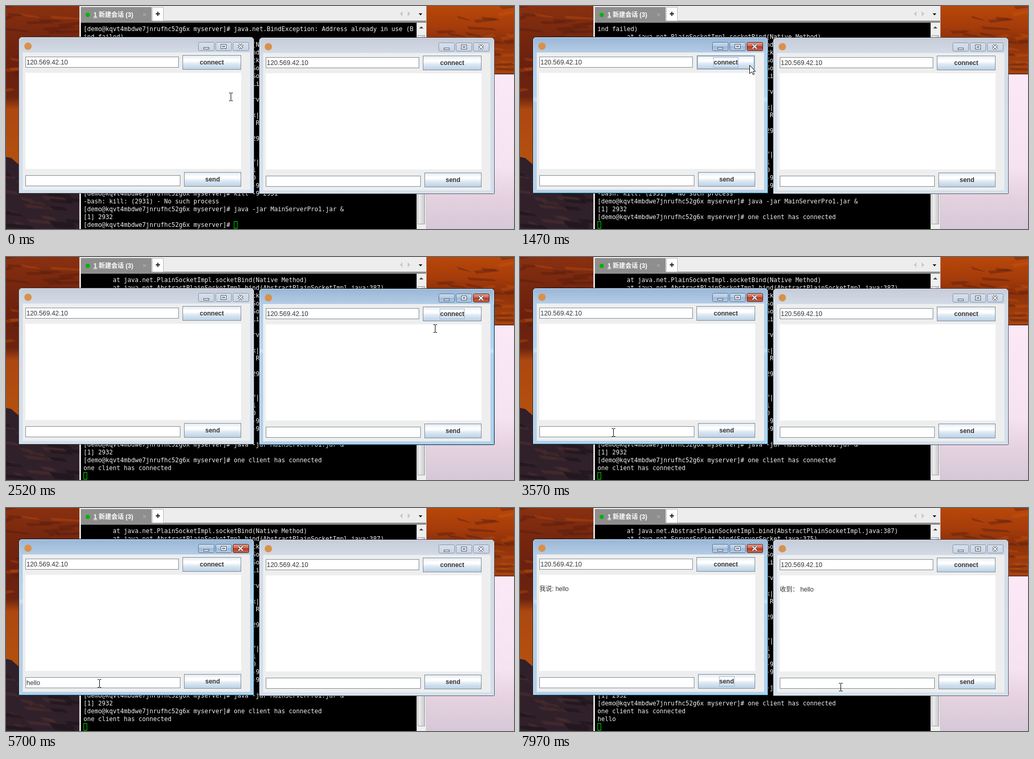
Animation, 970 px wide and 427 px high, one loop 8000 ms. Source, as an HTML page with a canvas:

```html
<!DOCTYPE html>
<html lang="en">
<head>
<meta charset="utf-8">
<title>Chat demo</title>
<style>
html, body { margin: 0; width: 100%; height: 100%; overflow: hidden; }
canvas { display: block; }
</style>
</head>
<body>
<canvas id="stage" width="970" height="427"></canvas>
<script>
const g = document.getElementById('stage').getContext('2d');
const LOOP = 8000, STEP = 150, LINE = 15;
const MONO = '11.63px "DejaVu Sans Mono", monospace';
const SANS = '"Liberation Sans", "Noto Sans CJK SC", sans-serif';

// Terminal contents; most rows show only in the gap between the two windows.
const prompt = '[demo@kqvt4mbdwe7jnrufhc52g6x myserver]# ';
const at = '        at java.net.';
const terminal = [
  prompt + 'java.net.BindException: Address already in use (B',
  'ind failed)',
  at + 'PlainSocketImpl.socketBind(Native Method)',
  at + 'AbstractPlainSocketImpl.bind(AbstractPlainSocketImpl.java:387)',
  at + 'ServerSocket.bind(ServerSocket.java:375)',
  at + 'ServerSocket.<init>(ServerSocket.java:237)',
  at + 'ServerSocket.<init>(ServerSocket.java:128)',
  ...['Li', '', 'rv', '', 'x|', ' R', '', '29', '', '', 'f|', '1 ', '0 ', '-9'].map(s => s.padStart(48)),
  prompt + 'kill -9 2931',
  '-bash: kill: (2931) - No such process',
  prompt + 'java -jar MainServerPro1.jar &',
  '[1] 2932'
];
const replies = [prompt + 'one client has connected', 'one client has connected', 'hello'];
const replyTimes = [1470, 2520, 6910];

// Mouse moves: start, number of steps, end point
const moves = [
  [120, 4, 405, 113], [1470, 6, 851, 114], [2520, 1, 819, 137],
  [2670, 6, 178, 336], [6010, 5, 419, 333], [7370, 5, 612, 343]
];

const within = (t, a, b) => t >= a && t < b;

function rect(x, y, w, h, fill) {
  g.fillStyle = fill;
  g.fillRect(x, y, w, h);
}
function frame(x, y, w, h, color) {
  g.strokeStyle = color;
  g.lineWidth = 1;
  g.strokeRect(x + .5, y + .5, w - 1, h - 1);
}
function text(s, x, y, font, color, align = 'left') {
  g.font = font;
  g.fillStyle = color;
  g.textAlign = align;
  g.fillText(s, x, y);
}
function shape(color, ...points) {
  g.fillStyle = color;
  g.beginPath();
  for (let i = 0; i < points.length; i += 2) g.lineTo(points[i], points[i + 1]);
  g.closePath();
  g.fill();
}
function dot(x, y, r, color) {
  g.fillStyle = color;
  g.beginPath();
  g.arc(x, y, r, 0, 7);
  g.fill();
}
function line(color, width, ...points) {
  g.strokeStyle = color;
  g.lineWidth = width;
  g.beginPath();
  for (let i = 0; i < points.length; i += 4) {
    g.moveTo(points[i], points[i + 1]);
    g.lineTo(points[i + 2], points[i + 3]);
  }
  g.stroke();
}
function shade(y0, y1, ...stops) {
  const fill = g.createLinearGradient(0, y0, 0, y1);
  for (let i = 0; i < stops.length; i += 2) fill.addColorStop(stops[i], stops[i + 1]);
  return fill;
}

function desktop() {
  let seed = 7;
  const random = () => (seed = seed * 16807 % 2147483647) / 2147483647;
  rect(0, 0, 141, 427, shade(0, 300, 0, '#8a3010', .2, '#75260e', .4, '#6a200e', .58, '#6c240f', .66, '#ac4810', 1, '#b4500e'));
  rect(803, 0, 167, 131, shade(0, 131, 0, '#b8480a', .3, '#a63c0a', .5, '#8c300a', 1, '#a8440e'));
  for (let i = 0; i < 70; i++) {
    const right = i % 2;
    const x = right ? 795 + random() * 160 : random() * 130 - 20, y = random() * (right ? 118 : 175);
    const w = 18 + random() * 42, tilt = random() * 14 - 7;
    shape(random() < .6 ? '#4a181058' : '#d25a1048', x, y, x + w, y + tilt, x + w + 8, y + tilt + 4, x + 5, y + 6);
  }
  shape('#30202a', 0, 289, 10, 291, 25, 304, 60, 325, 141, 345, 141, 427, 0, 427);
  for (let i = 0; i < 24; i++) {
    const x = random() * 140 - 20, y = 312 + random() * 110, w = 15 + random() * 35;
    shape(i % 2 ? '#4c2e2e90' : '#1a121890', x, y, x + w, y + 4, x + w + 8, y + 11, x + 6, y + 7);
  }
  rect(803, 130, 167, 297, shade(130, 427, 0, '#fbe9f7', .6, '#f5e3f2', .78, '#e6d2e0', 1, '#d6c8d8'));
  rect(803, 129, 167, 2, '#6c3028');
}

function terminalWindow(t) {
  rect(140, 0, 663, 427, '#ededed');
  rect(140, 0, 1, 427, '#d0d0d0');
  rect(143, 28, 659, 4, '#8e8e8e');
  rect(143, 2, 135, 28, '#8e8e8e');
  dot(156, 17, 4, '#00b400');
  text('1 新建会话 (3)', 167, 21, 'bold 12px ' + SANS, '#fff');
  rect(167, 22, 7, 1, '#fff');
  line('#c4c4c4', 1, 262, 14, 267, 19, 267, 14, 262, 19);
  rect(279, 2, 22, 26, '#fff');
  frame(279, 2, 22, 27, '#b8b8b8');
  rect(286, 14, 8, 2, '#222');
  rect(289, 11, 2, 8, '#222');
  shape('#c6c8d2', 757, 10, 752, 15, 757, 20);
  shape('#c6c8d2', 767, 10, 772, 15, 767, 20);
  shape('#111', 788, 14, 795, 14, 791.5, 18);

  rect(143, 32, 641, 395, '#000');
  rect(784, 32, 18, 395, '#efefef');
  shape('#444', 789, 43, 793, 39, 797, 43);
  const thumb = g.createLinearGradient(786, 0, 800, 0);
  thumb.addColorStop(0, '#f4f4f5');
  thumb.addColorStop(.5, '#e0e0e2');
  thumb.addColorStop(1, '#c4c4c8');
  rect(786, 56, 14, 362, thumb);
  frame(786, 56, 14, 362, '#a0a0a4');
  rect(802, 0, 1, 427, '#c4c4c4');

  const count = replyTimes.filter(x => t >= x).length;
  const rows = [...terminal, ...(count ? replies.slice(0, count) : [prompt])];
  rows.slice(count).forEach((row, i) => text(row, 148, 48 + i * LINE, MONO, '#f0f0f0'));
  frame(count ? 148 : 435, 412, 7, 14, '#00e000');
}

function button(label, x, y, w, { pressed, hover, focus }) {
  rect(x, y, w, 28, pressed ? '#b8cfe5'
    : shade(y, y + 28, 0, '#dde8f3', .3, '#fff', .4, '#fff', .6, '#dde8f3', 1, '#b8cfe5'));
  if (hover && !pressed) {
    frame(x, y, w, 28, '#b8cfe5');
    frame(x + 1, y + 1, w - 2, 26, '#7a8a99');
    frame(x + 2, y + 2, w - 4, 24, '#b8cfe5');
  } else {
    frame(x, y, w, 28, '#7a8a99');
    if (pressed) line('#7a8a99', 1, x, y + 1.5, x + w, y + 1.5);
  }
  const center = x + w / 2;
  text(label, center, y + 18, 'bold 12px ' + SANS, '#333', 'center');
  if (focus) {
    const size = Math.round(g.measureText(label).width) + 2;
    frame(Math.round(center - size / 2), y + 4, size, 20, '#a3b8cc');
  }
}

function field(s, y, w) {
  rect(37, y, w, 21, '#fff');
  frame(37, y, w, 21, '#7a8a99');
  text(s, 39, y + 15, '12.4px ' + SANS, '#333');
}

function titleButton(x, w, active, close) {
  const red = active && close;
  g.beginPath();
  g.roundRect(x + .5, 69.5, w - 1, 16, 2);
  g.fillStyle = red ? shade(69, 86, 0, '#e3a594', .45, '#cd6650', .5, '#b23a20', 1, '#cc6a4c')
    : active ? shade(69, 86, 0, '#c9dcef', .45, '#b4cce5', .5, '#9cb9d8', 1, '#b3cfe9')
    : shade(69, 86, 0, '#d8e1ec', 1, '#c7d4e4');
  g.fill();
  g.strokeStyle = red ? '#5c2018' : active ? '#5c7390' : '#8694a8';
  g.lineWidth = 1;
  g.stroke();
}

function chatWindow(dx, dy, { active, message, input, caret, connect, send }) {
  g.save();
  g.translate(dx, dy);
  g.beginPath();
  g.roundRect(24.5, 59.5, 449, 299, [6, 6, 1, 1]);
  g.fillStyle = active ? shade(60, 358, 0, '#9ab6d6', .1, '#b4cde7', .38, '#b9d3ec', .4, '#cfe2f4', .42, '#b4d0ea', 1, '#b5d0ea')
    : shade(60, 358, 0, '#c6ccd8', .1, '#d3dbe6', 1, '#d3e0ee');
  g.fill();
  g.lineWidth = 1;
  g.strokeStyle = active ? '#1c2630' : '#4c525c';
  g.stroke();
  g.beginPath();
  g.roundRect(25.5, 60.5, 447, 297, [5, 5, 0, 0]);
  g.strokeStyle = active ? '#d4ecfa' : '#e6ebf2';
  g.stroke();
  if (active) line('#62d2f2', 1, 472.5, 90, 472.5, 358, 25, 357.5, 473, 357.5);
  dot(42, 77, 7, '#d9914a');

  titleButton(367, 31, active);
  titleButton(400, 31, active);
  titleButton(433, 31, active, true);
  rect(377, 79, 11, 4, '#4a5260');
  rect(378, 80, 9, 2, '#fff');
  rect(410, 73, 11, 9, '#4a5260');
  rect(411, 74, 9, 7, '#fff');
  rect(413, 76, 5, 3, '#4a5260');
  rect(414, 77, 3, 1, '#fff');
  const cross = [444, 73.5, 452, 81.5, 452, 73.5, 444, 81.5];
  line('#4a5260', 4, ...cross);
  line('#fff', 2, ...cross);

  rect(32, 89, 434, 263, '#eee');
  field('120.569.42.10', 97, 293);
  button('connect', 337, 94, 112, connect);
  rect(37, 128, 412, 184, '#fff');
  text(message, 37, 159, '12px ' + SANS, '#333');
  field(input, 324, 296);
  if (caret) rect(39 + Math.round(g.measureText(input).width), 326, 1, 18, '#333');
  button('send', 340, 318, 109, send);
  g.restore();
}

function mouseAt(t) {
  let x = 429, y = 174;
  for (const [start, steps, endX, endY] of moves) {
    if (t < start) break;
    const p = Math.min(1, (Math.floor((t - start) / STEP) + 1) / steps);
    const eased = steps > 1 ? p * p * (3 - 2 * p) : p;
    x += (endX - x) * eased;
    y += (endY - y) * eased;
  }
  return { x: Math.round(x), y: Math.round(y) };
}

// Does the mouse lie in a box given in the coordinates of the left window?
function over({ x, y }, dx, dy, left, top, w, h) {
  return within(x - dx, left, left + w) && within(y - dy, top, top + h);
}

function pointer(m) {
  const overText = [[0, 0], [459, 1]].some(([dx, dy]) =>
    over(m, dx, dy, 37, 97, 293, 21) || over(m, dx, dy, 37, 128, 412, 184) || over(m, dx, dy, 37, 324, 296, 21));
  const { x, y } = m;
  if (overText) {
    rect(x, y - 7, 1, 14, '#000');
    for (const end of [-8, 7]) {
      rect(x - 3, y + end, 3, 1, '#000');
      rect(x + 1, y + end, 3, 1, '#000');
    }
    return;
  }
  g.save();
  g.translate(x + .5, y + .5);
  shape('#fff', 0, 0, 0, 16, 4, 12.5, 6.5, 18, 9, 17, 6.5, 11.5, 11, 11.5);
  g.strokeStyle = '#000';
  g.lineWidth = 1;
  g.stroke();
  g.restore();
}

function draw(t) {
  const m = mouseAt(t);
  const hover = (dx, dy, top) => over(m, dx, dy, top === 94 ? 337 : 340, top, 110, 28);
  const typed = t < 4640 || t >= 6910 ? 0 : Math.min(5, Math.floor((t - 4640) / STEP) + 1);
  const sent = t >= 6910;

  desktop();
  terminalWindow(t);
  chatWindow(0, 0, {
    active: within(t, 690, 2370) || t >= 3570,
    message: sent ? '我说: hello' : '',
    input: 'hello'.slice(0, typed),
    caret: within(t, 3870, 4330) || within(t, 4640, 5700) || within(t, 6010, 6460),
    connect: { pressed: within(t, 690, 1470), hover: hover(0, 0, 94), focus: within(t, 690, 2370) },
    send: { pressed: within(t, 6760, 6910), hover: hover(0, 0, 318), focus: t >= 6760 }
  });
  chatWindow(459, 1, {
    active: within(t, 2370, 3570),
    message: sent ? '收到： hello' : '',
    input: '',
    connect: { pressed: within(t, 2370, 2520), hover: hover(459, 1, 94), focus: within(t, 2370, 3570) },
    send: { hover: hover(459, 1, 318) }
  });
  pointer(m);
}

const begin = performance.now();
function tick() {
  draw((performance.now() - begin) % LOOP);
  requestAnimationFrame(tick);
}
tick();
</script>
</body>
</html>
```
